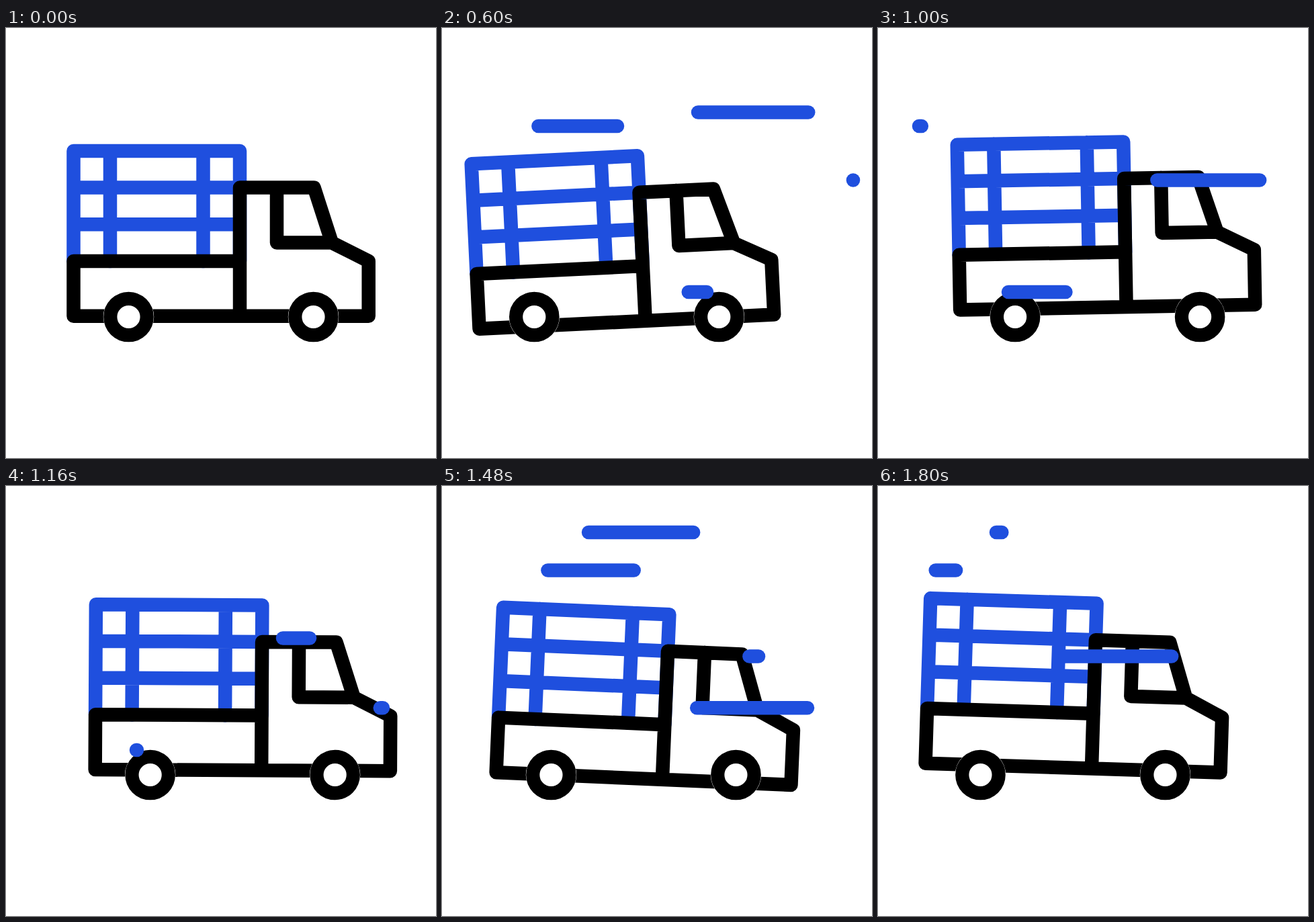
Write an HTML page that moves like this. It is 640 px wide and 640 px high and loops after 1.84 s.

```html
<!DOCTYPE html>
<html lang="en">
<head>
<meta charset="utf-8">
<title>Truck</title>
<style>
  html, body { margin: 0; width: 100%; height: 100%; overflow: hidden; background: #fff; }
  svg { display: block; width: 100%; height: 100%; }
  path { fill: none; stroke-width: 20.5; stroke-linecap: round; stroke-linejoin: round; }
  .blue, #wind path { stroke: #1f4fde; }
  .black { stroke: #000; }
  .gap { fill: #fff; }
  .tyre { fill: #fff; stroke: #000; stroke-width: 20.2; }
</style>
</head>
<body>
<svg viewBox="0 0 640 640">
  <defs>
    <g id="wheel">
      <circle class="gap" r="37.7"/>
      <circle class="tyre" r="27.2"/>
    </g>
  </defs>
  <g id="body">
    <path class="blue" d="M100.5 347V183H348V347M155 183V347M293.5 183V347M100.5 237.5H348M100.5 292.3H348"/>
    <path class="black" d="M348 347H100.5V428.75H539.7V347L485 319.5L458.5 237.5H348V428.75M403 237.5V319.5H485"/>
  </g>
  <g id="wheels">
    <use href="#wheel" x="182.5" y="430"/>
    <use href="#wheel" x="457.5" y="430"/>
  </g>
  <g id="wind">
    <path data-beat="0" d="M555.7 125.5h-200"/>
    <path data-beat="2" d="M261 146h-200"/>
    <path data-beat="5" d="M394 393h-200"/>
    <path data-beat="7" d="M612 226.5h-200"/>
    <path data-beat="18" d="M561 330.3h-200"/>
    <path data-beat="19" d="M376 69h-200"/>
    <path data-beat="20" d="M285.7 125.5h-200"/>
    <path data-beat="24" d="M471 253.5h-200"/>
  </g>
</svg>
<script>
const LOOP = 1840, STEP = 40;

// A streak grows from its front, then its tail catches up.
const WIND_START = 258, BEAT = 48, LENGTH = 200;
const GROW = 440, SHRINK = 390, LAG = 6 * BEAT;

const body = document.getElementById('body');
const wheels = document.getElementById('wheels');
const streaks = document.querySelectorAll('#wind path');

function ease(u) {
  u = Math.min(1, Math.max(0, u));
  return u * u * (3 - 2 * u);
}

// Swings from rest to each peak in turn; after the first they are evenly spaced.
function sway(t, first, gap, ...peaks) {
  if (t < first) return peaks[0] * ease(t / first);
  const beat = (t - first) / gap, i = Math.floor(beat);
  return peaks[i] + (peaks[i + 1] - peaks[i]) * ease(beat - i);
}

function drawStreak(streak, t) {
  const age = t - WIND_START - BEAT * streak.dataset.beat;
  const front = LENGTH * ease(age / GROW);
  const tail = LENGTH * ease((age - LAG) / SHRINK);
  const shown = age > 0 && age < LAG + SHRINK;
  streak.setAttribute('visibility', shown ? 'visible' : 'hidden');
  streak.setAttribute('stroke-dasharray', `${front - tail} ${2 * LENGTH}`);
  streak.setAttribute('stroke-dashoffset', -tail);
}

function draw(t) {
  const x = sway(t, 602, 524, -45.2, 33, -37.5, 0);
  const y = sway(t, 510, 460, 10.8, -13.4, 7.5, -11);
  const tilt = sway(t, 624, 1000, -2.78, 2.75, -9);
  body.setAttribute('transform', `translate(${x} ${y}) rotate(${tilt} 320.1 428.75)`);
  wheels.setAttribute('transform', `translate(${x} 0)`);
  streaks.forEach(streak => drawStreak(streak, t));
}

const begin = performance.now();
function tick() {
  const t = (performance.now() - begin) % LOOP;
  draw(Math.floor(t / STEP) * STEP);
  requestAnimationFrame(tick);
}
tick();
</script>
</body>
</html>
```
